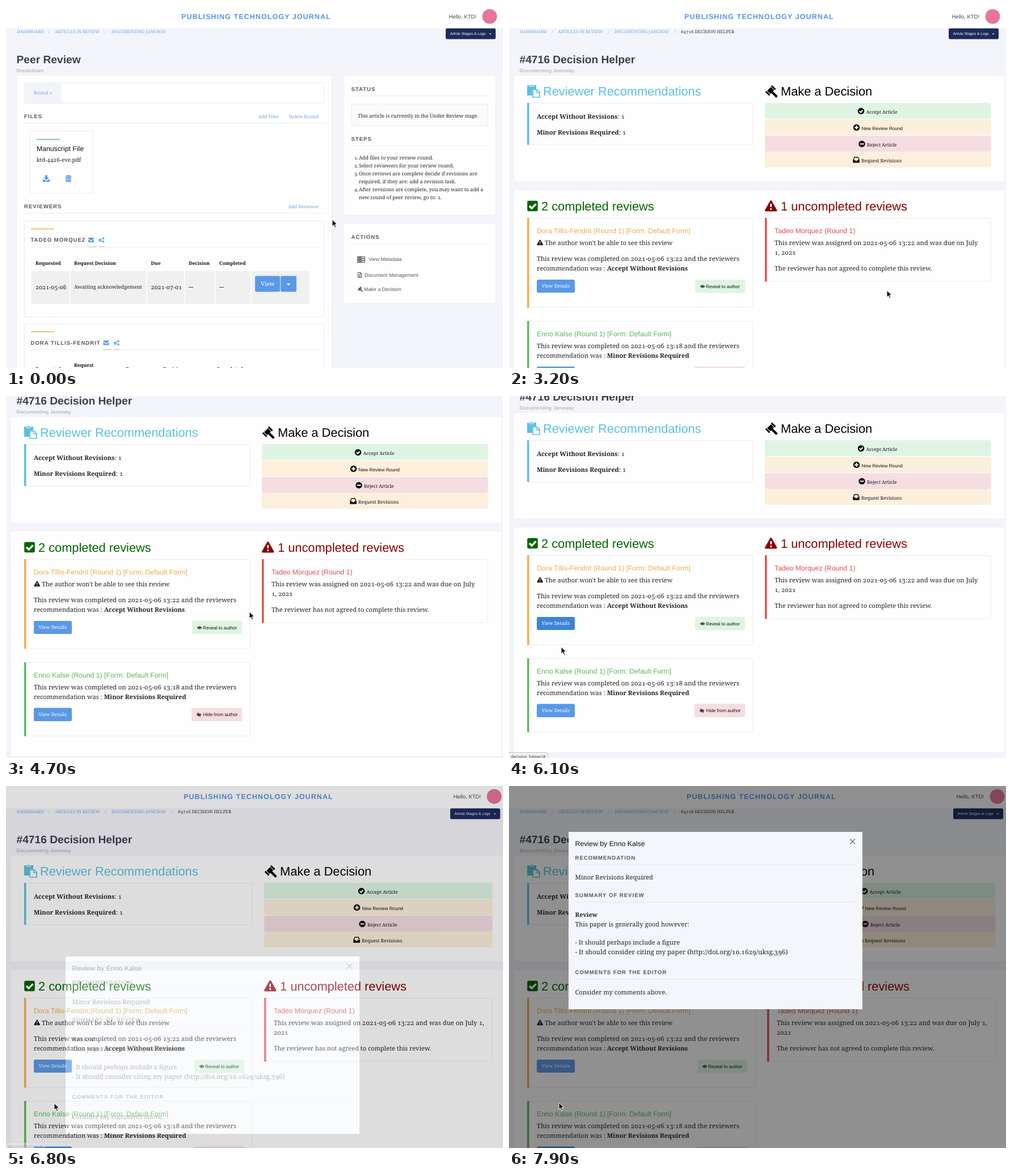
Animation, 876 px wide and 639 px high, one loop 8000 ms. Source, as an HTML page:

```html
<!DOCTYPE html>
<html lang="en">
<head>
<meta charset="utf-8">
<title>Peer review walkthrough</title>
<style>
html, body { margin: 0; width: 100%; height: 100%; overflow: hidden; background: #f4f5fa; }
svg { display: block; width: 876px; height: 639px; }
text { font-family: "Noto Serif", serif; font-variant-numeric: oldstyle-nums tabular-nums; text-rendering: geometricPrecision; white-space: pre; }
.s { font-family: "Liberation Sans", sans-serif; }
.u { font-family: "Noto Sans", sans-serif; }
.b { font-weight: bold; }
.h { font-family: "Liberation Sans", sans-serif; font-weight: bold; letter-spacing: 1px; }
</style>
</head>
<body>
<svg id="stage" viewBox="0 0 876 639"></svg>
<script>
const BLUE = '#5a99e6', BLUE_DARK = '#3d85d6', LINK = '#6aa8e8', INK = '#222', GREY = '#54565c';
const EDGE = '#ebecef', CYAN = '#5bc0de', ORANGE = '#f0ad4e', GREEN = '#5cb85c', RED = '#d9534f';
const MINT = '#def5e4', CREAM = '#fcefdc', ROSE = '#f5dde2';
const PEOPLE = { pending: 'Tadeo Morquez', first: 'Dora Tillis-Fendrit', second: 'Enno Kalse' };

// y is the vertical centre of the capitals; baselines sit on whole pixels
const text = (cls, x, y, size, str, fill = INK, extra = '') =>
  `<text class="${cls}" x="${x}" y="${Math.round(y + size * .345)}" font-size="${size}" fill="${fill}" ${extra}>${str}</text>`;
const rect = (x, y, w, h, fill, extra = '') =>
  `<rect x="${x}" y="${y}" width="${w}" height="${h}" fill="${fill}" ${extra}/>`;
const line = (x1, x2, y, fill = '#ededf0', w = 1) => rect(x1, y - w / 2, x2 - x1, w, fill);
const panel = (x1, y1, x2, y2) => rect(x1, y1, x2 - x1, y2 - y1, '#fefefe', 'stroke="#eeeff4"');
const box = (x1, y1, x2, y2, fill = '#fefefe') =>
  rect(x1 + .5, y1 + .5, x2 - x1 - 1, y2 - y1 - 1, fill, `rx="2" stroke="${EDGE}"`);
const button = (x1, y1, x2, y2, fill, cls = '') =>
  rect(x1, y1, x2 - x1, y2 - y1, fill, `rx="2.5" class="${cls}"`);
const heading = (x, y, str) => text('h', x, y, 9.55, str, GREY);
const bold = str => `<tspan class="b" font-size="11">${str}</tspan>`;
const caret = (x, y, r, fill) => `<path d="M${x - r} ${y - r / 2}h${2 * r}l${-r} ${r}z" fill="${fill}"/>`;
const icon = (name, x, y, scale, fill) =>
  `<g transform="translate(${x} ${y}) scale(${scale})" fill="${fill}">${ICONS[name]}</g>`;

// Glyphs centred on the origin, about 20 units across
const gear = (x, y, r) =>
  `<circle cx="${x}" cy="${y}" r="${r}" fill="none" stroke="${BLUE}" stroke-width="3"/>` +
  `<circle cx="${x}" cy="${y}" r="${r + 2}" fill="none" stroke="${BLUE}" stroke-width="2" stroke-dasharray="2.4 2.4"/>`;
const disc = mark => `<circle r="10"/><path d="${mark}" fill="none" stroke="#fff" stroke-width="3.4"/>`;
const EYE = '<path d="M-10 0Q0-13 10 0Q0 13-10 0z"/><circle r="4.4" fill="none" stroke="#eef8f0" stroke-width="1.6"/>';
const ICONS = {
  download: '<path d="M-3-10h6v7h5l-8 8-8-8h5z"/><path d="M-10 3h4l6 5 6-5h4v7h-20z"/>',
  trash: '<path d="M-9-8h5l1-2h6l1 2h5v2.500h-18zM-7.500-4h15v14h-15z"/><path d="M-4-1v8M0-1v8M4-1v8" stroke="#fff" stroke-width="1.600"/>',
  mail: '<path d="M-10-8h20v3l-10 7-10-7zM-10-2l10 7 10-7v10h-20z"/>',
  gears: gear(-4, 1, 3.6) + gear(7, -6, 1.6) + gear(7, 6, 1.6),
  servers: [-9, -2.5, 4].map(y => rect(-11, y, 22, 5, 'none', 'stroke="#444" stroke-width="1.6"') + rect(-9, y + 1.5, 11, 2, '#444')).join(''),
  file: '<path d="M-7-10h9l5 5v15h-14zM-5-8v16h10v-12h-4v-4zM-3-2h6v2h-6zM-2 2h4v4h-4z" fill-rule="evenodd"/>',
  gavel: '<g transform="translate(-1 -1) rotate(45)"><rect y="-2" width="17" height="4.400" rx="1.500"/><path d="M-4-5h8v10h-8zM-5-9h10v3h-10zM-5 6h10v3h-10z"/></g>',
  copy: '<path d="M-11-10h16v7h-7v11h-9z"/><path d="M-7-11h7v3h-7z" stroke="#fff"/><path d="M-1-2h8l4 4v9h-12z" fill="#fff" stroke="#5bc0de" stroke-width="1.700"/><path d="M6-2v5h5" fill="none" stroke="#5bc0de" stroke-width="1.500"/>',
  check: disc('M-5 0l4 4 6-7'),
  plus: disc('M-6 0h12M0-6v12'),
  minus: disc('M-6 0h12'),
  tray: '<path d="M-6-9h12l4 9v9h-20v-9zM-4.500-6.500l-3 7h4l1.500 3h4l1.500-3h4l-3-7z" fill-rule="evenodd"/>',
  square: '<rect x="-10" y="-10" width="20" height="20" rx="3"/><path d="M-6 0l4.500 4.500 8-8.500" fill="none" stroke="#fff" stroke-width="3.600"/>',
  warning: '<path d="M-1.500-9q1.500-2 3 0l9 16q.8 2.500-1.500 2.500h-18q-2.300 0-1.500-2.500z"/><path d="M0-4v6M0 4v3" stroke="#fff" stroke-width="2.600"/>',
  eye: EYE,
  hidden: EYE + '<path d="M-6-9l12 18" stroke="#111" stroke-width="2.400"/>'
};

function pageTop(w, title, subtitle) {
  const crumbs = [[19, 'DASHBOARD'], [86, 'ARTICLES IN REVIEW'], [186, 'DOCUMENTING JANEWAY']];
  return rect(0, 0, 876, 39, '#fff') +
    text('s b', 309 + w / 2, 19, 12.5, 'PUBLISHING TECHNOLOGY JOURNAL', '#5295e4', 'letter-spacing="1.08"') +
    text('s', 780.5 + w, 18.5, 9.5, 'Hello, KTD!', '#444') +
    `<circle cx="${852.5 + w}" cy="18.500" r="13" fill="#e8759a"/>` +
    crumbs.map(([x, s]) => text('', x, 45.7, 7.7, s, LINK)).join('') +
    [75, 174.5].map(x => text('', x, 45.7, 7.7, '/', '#aaa')).join('') +
    button(775 + w, 39.5, 863 + w, 58.5, '#1b2b5b') +
    text('s', 782.5 + w, 49, 6.6, 'Article Stages &amp; Logs', '#fff') + caret(853.5 + w, 49.5, 2, '#fff') +
    text('s b', 18.5, 94.5, 19.2, title, '#3d404d') +
    text('s b', 18.5, 114.3, 8.9, subtitle, '#bbbdc4');
}

function reviewerCard(y, name, iconX) {
  return box(32, y, 561, y + 170) + line(44, 85, y + 14.5, '#eeb55c', 1.6) +
    heading(43.5, y + 34, name.toUpperCase()) +
    icon('mail', iconX, y + 34, .5, BLUE) + icon('gears', iconX + 18, y + 34, .48, BLUE) +
    line(44, 550, y + 46.5) + line(iconX - 5, iconX + 9, y + 46, '#bbb') + line(iconX + 13, iconX + 24, y + 46, '#bbb');
}

function reviewPage() {
  const columns = [[52, 'Requested', '2021-05-06'], [120, 'Request Decision', 'Awaiting acknowledgement'],
    [255.5, 'Due', '2021-07-01'], [322, 'Decision', '--'], [376, 'Completed', '--']];
  const steps = ['Add files to your review round.', 'Select reviewers for your review round.',
    'Once reviews are complete decide if revisions are', 'required, if they are: add a revision task.',
    'After revisions are complete, you may want to add a', 'new round of peer review, go to: 1.'];
  const numbers = ['1.', '2.', '3.', '', '4.', ''];
  const cellSize = { 2: 10.4, A: 9.05, '-': 13 };
  return pageTop(0, 'Peer Review', 'Breakdown') +
    panel(18.5, 122, 574.5, 700) + panel(595, 122, 863, 369) + panel(595, 383, 863, 525) +
    box(32, 135, 561, 172) + rect(32, 135, 65, 36, '#f3f4f9') + text('', 49, 153.5, 8.15, 'Round 1', LINK) +
    heading(32, 194.5, 'FILES') + text('', 444.5, 195, 8.25, 'Add Files', LINK) +
    text('', 498.5, 195, 8.25, 'Delete Round', LINK) + line(32, 561, 206.5) +
    box(42, 220, 154, 331) + line(54, 95, 235.5, '#62b98a', 1.6) +
    text('s', 54, 251.7, 12.24, 'Manuscript File', '#111') + text('', 54, 272, 9.8, 'ktd-4426-eve.pdf') +
    icon('download', 71, 304.5, .6, BLUE) + icon('trash', 110, 304.5, .6, BLUE) +
    heading(32, 353.3, 'REVIEWERS') + text('', 497.5, 354, 8.15, 'Add Reviewer', LINK) + line(32, 561, 365.5) +
    reviewerCard(379, PEOPLE.pending, 150) +
    rect(45, 468, 490, 57.5, '#f0f0f0') +
    [112.5, 248, 314.5, 368.5, 432].map(x => rect(x - .7, 468, 1.4, 57.5, '#fff')).join('') +
    columns.map(([x, head, cell]) => text('b', x, 454, 8.5, head, '#111') +
      text('', x, 496, cellSize[cell[0]], cell)).join('') +
    button(439, 476.5, 483, 504.5, BLUE) + button(484, 476.5, 512, 504.5, BLUE) +
    text('', 449, 490.5, 10.2, 'View', '#fff') + caret(498, 491.5, 3.4, '#fff') +
    reviewerCard(560.5, PEOPLE.first, 176.5) +
    text('b', 120, 634, 8.5, 'Request', '#111') +
    [[52, 'Requested'], [211, 'Due'], [277, 'Decision'], [371, 'Completed']].map(([x, s]) => text('b', x, 641, 8.5, s, '#111')).join('') +
    heading(608.5, 147, 'STATUS') + line(609, 849, 158.5) + box(608.5, 172.5, 849.5, 212, '#fbfbfb') +
    text('', 620, 194, 8.86, 'This article is currently in the Under Review stage.') +
    heading(608.5, 235, 'STEPS') + line(609, 849, 246.5) +
    steps.map((s, i) => text('', 622, 268 + 14 * i, 8.83, s) + text('', 614, 268 + 14 * i, 8.4, numbers[i])).join('') +
    heading(608.5, 408, 'ACTIONS') + line(609, 849, 419.5) +
    icon('servers', 626, 447.5, .58, '#444') + text('s', 639, 447.3, 8.9, 'View Metadata', GREY) +
    icon('file', 623.5, 475, .5, '#444') + text('s', 632, 474.7, 8.9, 'Document Management', GREY) +
    icon('gavel', 624, 499.5, .4, '#444') + text('s', 631, 499.7, 8.9, 'Make a Decision', GREY, 'id="decide"');
}

function reviewCard(x1, y1, x2, y2, color, title) {
  return box(x1, y1, x2, y2) + rect(x1, y1, 3.5, y2 - y1, color) + text('s', x1 + 17, y1 + 22.7, 12.27, title, color);
}

function completed(y, time, verdict) {
  return text('', 49, y, 11.28, `This review was completed on 2021-05-06 ${time} and the reviewers`) +
    text('', 49, y + 17, 11.1, `recommendation was : ${bold(verdict)}`);
}

// w is the extra width gained when the scrollbar disappears
function helperPage(w) {
  const mid = 451 + w / 2, left = 430.5 + w / 2, right = 849.5 + w, shift = w * .75;
  const choices = [['', MINT, 'check', 620.5, 'Accept Article'], ['s', CREAM, 'plus', 612.5, 'New Review Round'],
    ['', ROSE, 'minus', 622, 'Reject Article'], ['', CREAM, 'tray', 612, 'Request Revisions']];
  const due = w ? ['July 1,', '2021'] : ['July', '1, 2021'];
  const form = ' (Round 1) [Form: Default Form]';
  return pageTop(w, '#4716 Decision Helper', 'Documenting Janeway') +
    text('', 291, 45.7, 7.7, '/', '#aaa') + text('', 303, 45.7, 7.8, '#4716 DECISION HELPER', '#333') +
    panel(8, 122, 874 + w, 310) + panel(8, 324, 874 + w, 722.5) +
    icon('copy', 43, 150, 1, CYAN) + text('s', 60, 150, 21.8, 'Reviewer Recommendations', CYAN) +
    box(32, 171, left, 245.5) + rect(32, 171, 3.5, 74, CYAN) +
    text('', 49, 195, 11, `${bold('Accept Without Revisions')}: 1`) +
    text('', 49, 223, 11, `${bold('Minor Revisions Required')}: 1`) +
    icon('gavel', mid + 11, 150, .95, '#000') + text('s', mid + 28, 150, 21.8, 'Make a Decision', '#000') +
    choices.map(([cls, fill, name, x, label], i) => {
      const y = Math.round(171.3 + 28.67 * i);
      return button(mid, y, right, y + 28, fill) + icon(name, x + shift, y + 14.5, .58, '#111') +
        text(cls, x + shift + 9, y + 16, cls ? 8.26 : 8.3, label, '#111');
    }).join('') +
    icon('square', 41.5, 353, .93, '#006400') + text('s', 57, 353, 21.8, '2 completed reviews', '#006400') +
    icon('warning', mid + 10.7, 353, 1, '#8b0000') + text('s', mid + 28, 353, 21.8, '1 uncompleted reviews', '#8b0000') +
    reviewCard(32, 374, left, 532.5, ORANGE, PEOPLE.first + form) +
    icon('warning', 54.7, 417.5, .5, '#111') + text('', 63, 418, 11.06, "The author won't be able to see this review") +
    completed(446.5, '13:22', 'Accept Without Revisions') +
    button(49, 483, 116, 506, BLUE, 'view1') + text('', 57.5, 494.5, 8.4, 'View Details', '#fff') +
    button(left - 102.5, 483, left - 14.5, 506.5, MINT) + icon('eye', left - 89.5, 495, .42, '#111') +
    text('s', left - 83.5, 495, 8.2, 'Reveal to author', '#111') +
    reviewCard(32, 556, left, 686.5, GREEN, PEOPLE.second + form) + completed(600, '13:18', 'Minor Revisions Required') +
    button(49, 636.5, 116, 660, BLUE, 'view2') + text('', 57.5, 648.5, 8.4, 'View Details', '#fff') +
    button(left - 103.5, 636.5, left - 14.5, 660, ROSE) + icon('hidden', left - 90.5, 648.5, .42, '#111') +
    text('s', left - 83, 648.5, 8.2, 'Hide from author', '#111') +
    reviewCard(mid, 374, right, 486.5, RED, PEOPLE.pending + ' (Round 1)') +
    text('', mid + 17, 418, 11.28, `This review was assigned on 2021-05-06 13:22 and was due on ${due[0]}`) +
    text('', mid + 17, 435.5, 11, due[1]) +
    text('', mid + 17, 463.5, 11.02, 'The reviewer has not agreed to complete this review.');
}

function modal() {
  const body = [[161.5, 'Minor Revisions Required'], [244, 'This paper is generally good however:'],
    [276.5, '- It should perhaps include a figure'], [364, 'Consider my comments above.']];
  return '<path d="M-99-900H999V1500H-99zM105 81V394H623V81z" fill="#0a0a0a" fill-opacity=".45" fill-rule="evenodd"/>' +
    rect(105, 81, 518, 313, '#f4f6fb') +
    text('s', 116.5, 101.3, 12.3, `Review by ${PEOPLE.second}`, '#111') +
    '<path d="M601 93.500l9 9m0-9l-9 9" stroke="#777" stroke-width="1.500"/>' +
    [[127, 'RECOMMENDATION'], [193, 'SUMMARY OF REVIEW'], [329, 'COMMENTS FOR THE EDITOR']]
      .map(([y, s]) => heading(116.5, y, s) + line(116.5, 610, y + 12, '#e4e6eb')).join('') +
    text('b', 116.5, 227.5, 10.8, 'Review') + body.map(([y, s]) => text('', 116.5, y, 11.1, s)).join('') +
    text('', 116.5, 293, 11.55, '- It should consider citing my paper (http://doi.org/10.1629/uksg.396)');
}

const $ = id => document.getElementById(id);
$('stage').innerHTML = rect(0, 0, 876, 639, '#f4f5fa') +
  `<g id="review">${reviewPage()}</g><g id="helper">${helperPage(0)}</g><g id="wide">${helperPage(8)}</g>` +
  `<g id="modal">${modal()}</g>` +
  `<g id="status">${rect(-4, 629.5, 72, 14, '#f1f1f3', 'rx="2" stroke="#c4c5c8"')}` +
  `${text('u', 64.5, 636, 7.3, 'decision_helper/#', '#444', 'text-anchor="end"')}</g>` +
  '<g id="arrow"><path d="M0 0v12l2.800-2.600 2 4.500 2-.9-2-4.400h3.800z" fill="#111" stroke="#fff" stroke-width=".9"/></g>' +
  '<g id="hand"><path d="M-1 0q1.300-1.200 2.400 0v5l5.500 1.200q1.200.4 1 2l-.8 5.800h-7l-4-5.500q.5-1.800 2.900.2z" fill="#fff" stroke="#111" stroke-width="1"/></g>';

const POINTER = [[300, 575, 377], [500, 588, 399], [800, 642, 468], [1000, 665, 496], [1200, 668, 501], [1300, 669, 504],
  [1800, 669, 507], [3100, 669, 507], [3200, 666, 502], [3600, 540, 432], [4000, 430, 382], [4100, 429, 381],
  [5100, 429, 381], [5200, 420, 386], [5400, 340, 425], [5600, 225, 452], [5800, 125, 432], [6000, 88, 405],
  [6100, 92, 443], [6300, 88, 518], [6400, 86, 550], [6600, 85, 560], [7800, 85, 560], [7900, 88, 559]];
const SCROLL = [[4300, 0], [4400, 5], [4500, 29], [4600, 62], [4700, 86], [4800, 93]];
const BUBBLE = [[1000, 0], [1100, 1], [1800, 1], [2000, 0], [6000, 0], [6100, 1], [6600, 1], [6900, 0]];

function track(keys, t) {
  const i = keys.findIndex(k => k[0] > t);
  if (i === 0) return keys[0].slice(1);
  if (i < 0) return keys[keys.length - 1].slice(1);
  const [a, b] = [keys[i - 1], keys[i]], f = (t - a[0]) / (b[0] - a[0]);
  return a.slice(1).map((v, n) => v + (b[n + 1] - v) * f);
}
const show = (id, on) => { $(id).style.display = on ? '' : 'none'; };
const paint = (selector, fill) => document.querySelectorAll(selector).forEach(e => e.setAttribute('fill', fill));
const within = (t, a, b) => t >= a && t < b;

function render(t) {
  const [x, y] = track(POINTER, t), [scroll] = track(SCROLL, t);
  const rest = Math.min(1, Math.max(0, (7180 - t) / 540));
  const onLink = within(t, 1000, 1800) || within(t, 5900, 6100) || within(t, 6400, 6600);
  show('review', t < 1800);
  show('helper', within(t, 1800, 6600));
  show('wide', t >= 6600);
  show('modal', t >= 6600);
  show('hand', onLink);
  show('arrow', !onLink);
  $('helper').setAttribute('transform', `translate(0 ${-Math.round(scroll)})`);
  $('modal').setAttribute('transform', `translate(0 ${Math.round(313 * rest)})`);
  $('modal').setAttribute('opacity', 1 - rest);
  $('status').setAttribute('opacity', track(BUBBLE, t)[0]);
  for (const id of ['arrow', 'hand']) $(id).setAttribute('transform', `translate(${Math.round(x)} ${Math.round(y)})`);
  paint('#decide', within(t, 1000, 1800) ? '#111' : GREY);
  paint('.view1', within(t, 5900, 6200) ? BLUE_DARK : BLUE);
  paint('.view2', t >= 6400 ? BLUE_DARK : BLUE);
}

const start = performance.now();
function tick() {
  const t = (performance.now() - start) % 8000;
  render(Math.floor(t / 100) * 100);
  requestAnimationFrame(tick);
}
tick();
</script>
</body>
</html>
```
